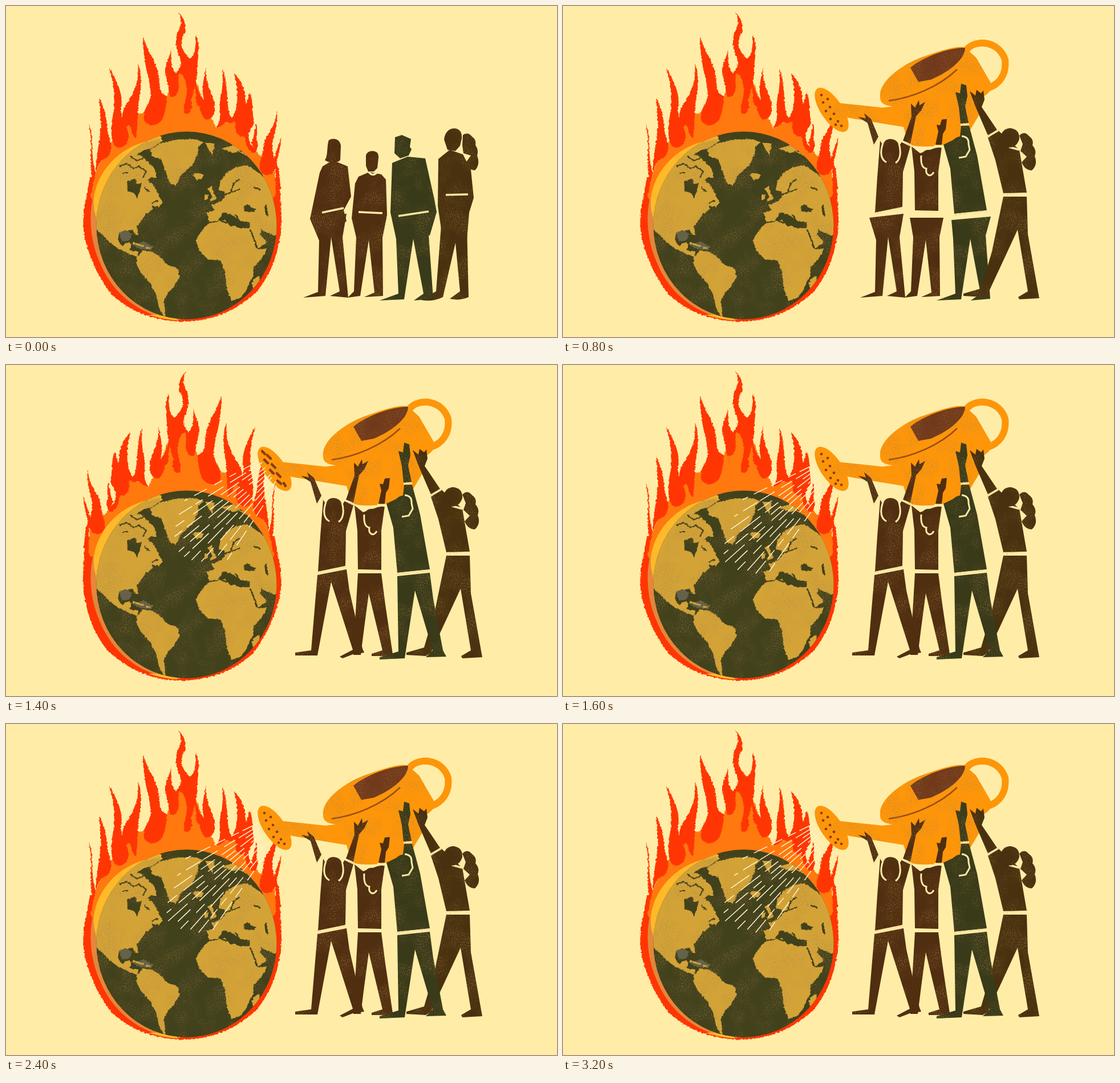
An HTML page for the animation above (3.4 s loop, 966 px wide and 580 px high).

```html
<!DOCTYPE html>
<html lang="en">
<head>
<meta charset="utf-8">
<title>Watering the world</title>
<style>
html, body { margin: 0; width: 100%; height: 100%; overflow: hidden; background: #ffeda7; }
svg { display: block; width: 966px; height: 580px; }
.red { fill: #ff3603; }
.orange { fill: #ff790f; }
.land { fill: #d3a337; }
.sea { fill: #41411c; }
.brown { fill: #502e10; }
.olive { fill: #49310f; }
.green { fill: #393a19; }
.can { fill: #ff9609; }
.seam { fill: none; stroke: #ffeda7; stroke-width: 3.5; }
.strait { fill: none; stroke: #41411c; stroke-width: 2.4; stroke-linejoin: round; }
.holes { fill: none; stroke: #8a3d10; stroke-width: 4.5; stroke-linecap: round; }
.water { fill: none; stroke: #fff3cc; stroke-width: 1.5; }
.off { display: none; }
</style>
</head>
<body>
<svg viewBox="0 0 966 580">
<defs>
  <filter id="grain" x="-5%" y="-5%" width="110%" height="110%" color-interpolation-filters="sRGB">
    <feTurbulence type="fractalNoise" baseFrequency=".5" numOctaves="2" seed="4"/>
    <feColorMatrix values="0 0 0 0 .66  0 0 0 0 .5  0 0 0 0 .27  5 0 0 0 -2.3" result="dots"/>
    <feTurbulence type="fractalNoise" baseFrequency=".025" numOctaves="3" seed="9"/>
    <feColorMatrix values="0 0 0 0 0  0 0 0 0 0  0 0 0 0 0  3 0 0 0 -1.2" result="patches"/>
    <feComposite in="dots" in2="patches" operator="in"/>
    <feComposite in2="SourceAlpha" operator="in"/>
    <feComponentTransfer result="specks"><feFuncA type="linear" slope=".45"/></feComponentTransfer>
    <feMerge><feMergeNode in="SourceGraphic"/><feMergeNode in="specks"/></feMerge>
  </filter>
  <filter id="rough" x="-5%" y="-5%" width="110%" height="110%" color-interpolation-filters="sRGB">
    <feTurbulence type="fractalNoise" baseFrequency=".25" numOctaves="2" seed="8"/>
    <feDisplacementMap in="SourceGraphic" scale="4" xChannelSelector="R" yChannelSelector="G"/>
  </filter>
  <clipPath id="disc"><ellipse cx="316.5" cy="384.5" rx="158" ry="164.5"/></clipPath>
</defs>

<g id="fire"><g filter="url(#rough)">
  <path class="red" d="M147 300C142 335 133 355 136 392C139 425 160 475 185 505C215 535 260 553 316 553C365 552 410 530 440 500C465 470 482 425 483 375C483 345 479 325 480 300Z"/>
  <path class="orange" d="M148 335L152 302L158 290L170 262L187 235L205 192L238 188L262 180L282 158L300 117L330 125L346 165L368 213L397 200L420 200L427 238L444 262L470 268L474 330L400 400H200Z"/>
  <g class="red">
    <path d="M151 305C145 275 153 245 145 206C156 232 147 262 157 291L149 332Z"/>
    <path d="M163 160C178 190 176 205 178 222C188 240 186 265 172 268C164 270 161 282 158 290C157 270 162 250 165 225C168 205 165 185 163 160Z"/>
    <path d="M181 108C192 128 206 150 202 180C200 195 206 200 212 215C220 235 210 248 198 248C185 247 183 225 186 200C192 170 191 140 181 108Z"/>
    <path d="M231 100C240 125 237 145 233 165C231 178 232 200 228 232C218 225 222 210 214 208C206 225 200 215 205 185C210 165 236 150 231 100Z"/>
    <path d="M240 54C250 85 268 100 269 135C270 150 275 155 282 158C280 190 275 208 256 209C238 207 238 190 250 170C262 145 240 115 240 54Z"/>
    <path d="M290 73C288 95 291 113 298 118C306 118 303 105 306 100L302 130C305 150 300 160 290 159C284 157 287 145 281 125C274 105 287 95 290 73Z"/>
    <path d="M302 10C312 22 320 35 311 52C304 65 309 80 322 92C331 90 333 70 333 50C342 75 335 90 335 120C334 140 328 150 325 165C328 175 325 188 318 189C308 188 312 175 316 160C320 140 312 115 300 118C292 120 308 112 307 98C304 85 295 75 299 52C302 40 313 35 302 10Z"/>
    <path d="M351 108C349 135 358 145 364 165C370 185 362 200 352 199C340 195 345 180 334 172L330 120C334 145 340 160 347 163C342 145 347 125 351 108Z"/>
    <path d="M379 110C390 135 386 165 391 185C392 195 398 200 404 195L398 203C388 210 392 200 385 205C378 210 372 213 369 213C380 195 372 185 376 160C380 140 381 130 379 110Z"/>
    <path d="M400 118C415 132 420 150 420 172C424 168 424 160 427 152C434 165 431 185 434 197C437 215 423 215 426 235C428 245 438 250 439 256C425 262 420 240 418 228C405 232 400 215 403 205C398 200 390 200 395 198C408 180 408 150 400 118Z"/>
    <path d="M439 206C443 225 436 230 442 245L438 256L430 240C436 230 434 220 439 206Z"/>
    <path d="M475 183C477 210 470 222 467 240C466 255 470 262 470 268C475 250 478 245 482 229C483 250 474 265 475 280L470 288C466 298 450 300 445 287C443 275 450 265 451 248C453 225 470 222 475 183Z"/>
    <path d="M472 272C480 285 479 300 482 320L474 330C470 310 477 290 470 280Z"/>
  </g>
</g></g>

<g id="globe" filter="url(#grain)">
  <path fill="#e6873a" d="M153 334C145 365 147 410 164 448C186 505 240 548 305 550L330 400L200 334Z"/>
  <path fill="#ffba29" d="M161 378C148 350 153 320 170 292C192 258 225 238 272 232L300 300L200 380Z"/>
  <path fill="#ffba29" d="M250 541Q275 549 300 551L300 540Z"/>
  <ellipse class="sea" cx="316.5" cy="384.5" rx="158" ry="164.5"/>
  <g clip-path="url(#disc)"><g filter="url(#rough)">
    <path fill="#f5b52d" d="M155 380V290L190 250L268 224L275 236L245 252L205 270L175 310L163 380Z"/>
    <g class="land">
      <path d="M150 385L160 345L175 300L196 272L222 258L240 264L250 275L262 286L264 302L254 300L248 306L258 313L267 330L275 344L268 352L255 350L258 356L246 364L238 374L230 386L232 402L226 400L222 392L208 394L198 398L196 410L203 420L214 414L220 417L216 428L232 430L231 440L215 434L196 425L180 412L168 400Z"/>
      <path d="M203 262L225 245L268 233L272 238L254 250L240 252L228 262L212 266Z"/>
      <path d="M252 252L272 240L300 234L332 233L346 239L337 247L336 260L326 280L308 295L297 315L287 310L279 288L272 268L257 264Z"/>
      <path d="M327 297L333 292L346 295L345 301L335 305Z"/>
      <path d="M230 440L240 428L258 431L273 442L282 453L302 461L304 476L295 491L285 501L277 516L280 548L269 532L263 505L252 485L237 468L228 452Z"/>
      <path d="M350 240L366 240L362 260L355 252ZM378 250L400 243L415 252L398 258ZM403 253L435 260L425 264Z"/>
      <path d="M354 320L361 315L364 328L370 338L357 343L361 333ZM348 332L354 330L354 338L348 340Z"/>
      <path d="M373 323L376 306L388 291L405 282L424 279L445 294L480 320L480 402L466 401L448 392L446 400L457 414L441 426L433 408L427 390L428 379L410 377L399 367L390 364L380 362L372 376L356 378L352 362L366 358L360 349L374 343L384 335L383 325Z"/>
      <path d="M356 381L385 375L392 385L404 386L409 390L427 389L432 405L441 427L458 425L448 443L434 458L434 473L426 485L421 499L410 512L395 517L387 495L384 466L376 446L354 444L339 429L333 410L345 391Z"/>
      <path d="M443 472Q448 485 436 497Q428 490 434 479Z"/>
    </g>
    <g class="sea">
      <path d="M212 308L226 302L230 312L238 310L235 322L230 337L224 328L213 324Z"/>
      <path d="M416 352L424 347L430 353L439 356L434 361L418 360Z"/>
      <path d="M453 350L457 348L460 370L455 365Z"/>
    </g>
    <path class="strait" d="M198 281L212 276L224 285L233 281L246 290L240 301M218 263L229 271L243 266M204 293L214 292M242 318L252 326M256 346L266 340"/>
    <path class="strait" d="M380 332L394 327L399 311L410 303M397 326L410 321M382 365L392 374L398 380M402 365L411 380M376 377L390 380L407 386L426 383"/>
    <path class="strait" d="M428 391L441 425M441 426L459 422M447 391L458 402L470 405M435 318L447 322"/>
    <path fill="#66624a" d="M198 397L212 393L221 400L216 411L203 413ZM222 418L241 413L258 421L255 428L234 426Z"/>
    <path class="land" d="M222 414L242 419L240 422L222 417ZM245 422L255 424L247 427Z"/>
  </g></g>
</g>

<g id="stand" filter="url(#grain)">
  <g class="brown">
    <path d="M566 235C575 230 586 234 587 245L586 270C580 277 565 275 559 270C565 262 562 245 566 235Z"/>
    <path d="M555 281L570 272L582 274L599 281L605 334L592 358L597 377L549 411L533 373L550 292Z"/>
    <path d="M631 262Q633 254 643 254Q654 255 653 266L651 284L645 290L635 290L631 280Z"/>
    <path d="M618 299L637 291L658 295L666 304L668 366L660 405L614 405L606 372L612 311Z"/>
  </g>
  <g class="olive">
    <path d="M768 234C770 218 780 213 790 215Q800 218 799 232L796 245L788 254L774 252Z"/>
    <path d="M758 268L778 252L801 260L815 287L820 336L812 362L808 410L765 405L757 350Z"/>
    <path d="M801 226Q810 220 817 229Q825 234 823 244Q829 252 826 262Q832 278 822 288Q812 288 805 276L815 262L802 258L800 244Z"/>
    <path d="M763 384H808L811 510Q795 517 778 513L796 500L788 415L766 510Q748 519 727 515L754 500Z"/>
  </g>
  <path class="green" d="M682 230L694 226L710 233L708 247L711 251L706 262L691 267L681 258Z"/>
  <path class="green" d="M677 275L704 264L735 267L751 339L755 361L743 402L684 408L674 362Z"/>
  <path class="seam" d="M554 362L592 354M618 361L660 363M688 368L741 360M771 331L810 330M636 291Q643 300 651 291"/>
</g>
<g id="legs" filter="url(#grain)">
  <path class="brown" d="M537 371L597 364L590 405L600 511L568 508L585 500L570 405L560 508L521 511L547 501L549 410Z"/>
  <path class="brown" d="M608 371H667L660 405L661 508L628 510L646 502L636 410L621 508L599 511L610 500L614 405Z"/>
  <path class="green" d="M681 375L750 369L741 402L749 513L715 516L732 504L714 408L698 514L655 516L688 504L684 408Z"/>
</g>

<g id="can" class="off">
  <g filter="url(#grain)">
    <path d="M708 76C725 57 765 62 775 94C778 120 765 138 744 144" fill="none" stroke="#ff9609" stroke-width="12"/>
    <path class="can" d="M556 160C553 130 600 98 640 86C672 74 700 68 706 74L724 90L749 133C754 145 748 152 738 158L730 190L705 232C680 243 630 252 606 242L597 212L495 195L484 170L560 178L578 176C566 174 556 172 556 160Z"/>
    <path fill="#71391a" d="M609 108C630 90 675 73 705 73C705 92 680 114 645 129L623 133Z"/>
    <path d="M571 166C612 161 660 141 691 111" fill="none" stroke="#9a4c13" stroke-width="2.5"/>
    <ellipse class="can" cx="471" cy="182" rx="45" ry="19" transform="rotate(56 471 182)"/>
  </g>
  <path id="dots" class="holes" d="M453 156h.1M464 163h.1M456 169h.1M468 177h.1M461 184h.1M475 189h.1M469 198h.1M482 202h.1M478 208h.1M488 210h.1"/>
  <path id="slots" class="holes" d="M449 151l5 5M458 158l6 6M453 166l6 6M466 174l6 6M463 184l6 6M475 190l6 6M476 203l6 5M487 207l3 5"/>
</g>

<g id="arms" class="off" filter="url(#grain)">
  <path class="brown" d="M517 194L531 197L528 188L540 198L553 229L545 243L534 205Z"/>
  <path class="brown" d="M596 236L611 194L610 171L617 178L624 165L625 174L635 168L628 183L619 193L609 241Z"/>
  <path class="brown" d="M653 243L658 220L655 208L661 209L664 199L673 198L671 216L666 224L664 243Z"/>
  <path class="green" d="M697 206L694 177L688 151L696 153L698 136L707 139L709 158L705 176L711 205Z"/>
  <path class="olive" d="M745 227L723 176L713 149L723 157L725 147L733 153L737 148L739 164L734 177L761 217Z"/>
</g>

<g id="lift" class="off" filter="url(#grain)">
  <path class="brown" d="M556 236L563 248H588L594 238L609 246L596 291L595 352L547 362L551 300Z"/>
  <path class="brown" d="M611 246L626 258L652 249L664 247L658 290L658 359L617 358L616 290Z"/>
  <path class="green" d="M667 243L696 229L698 210L712 210L726 262L743 358L686 364L679 285Z"/>
  <path class="olive" d="M745 231L763 218L781 235L800 252L813 327L772 328L758 270Z"/>
  <path class="brown" d="M560 248Q562 233 574 233Q588 234 590 248L588 268Q574 280 562 268Z"/>
  <path class="brown" d="M628 265Q630 252 641 252Q655 254 655 267L650 290L638 290Z"/>
  <path class="green" d="M680 240Q690 224 709 230L712 250L705 263L692 267L681 258Z"/>
  <g class="seam">
    <path d="M545 246L556 230M594 237L611 245M651 245L666 247M697 208L712 207M744 229L763 218M546 364L596 354M616 361H659M685 366L744 360M771 331L813 329M782 247L800 252"/>
    <path d="M561 240C556 255 556 268 567 274M589 241C593 255 592 269 583 275M628 262C627 276 630 284 637 285C635 297 645 301 650 291M699 228Q712 229 711 242L713 252L706 264L694 266" stroke-width="3"/>
  </g>
  <path class="olive" d="M767 231Q769 215 784 214Q801 216 800 233Q796 247 783 248Q768 244 767 231Z"/>
  <path class="olive" d="M800 227Q809 218 817 228Q826 234 823 244Q831 253 827 263Q833 278 822 288Q810 288 804 274L813 264L802 254L806 242Z"/>
  <path class="olive" d="M772 334H813L815 400L831 490L835 512L800 514L798 510L815 500L797 392L745 504L736 510L702 508V504L733 495L752 430Z"/>
</g>
<g id="stride" class="off" filter="url(#grain)">
  <path class="brown" d="M546 368L597 358L602 395L625 497L628 504L608 507L590 514L585 511L608 499L570 380L546 509H507V504L535 500Z"/>
  <path class="brown" d="M617 365H658L665 420L677 500L678 507L660 510H641V506L660 500L636 400L628 460L622 508L609 508L612 450Z"/>
  <path class="green" d="M686 370L743 364L749 410L766 500L772 511L736 512L748 500L717 395L699 514L655 516V512L688 502Z"/>
</g>
<path id="sprayA" class="water off"/>
<path id="sprayB" class="water off"/>
</svg>
<script>
const el = id => document.getElementById(id);
const show = (id, on) => el(id).classList.toggle('off', !on);

let seed = 7;
const rand = () => (seed = seed * 16807 % 2147483647) / 2147483647;
const curve = (a, b, c, u) => (1 - u) * (1 - u) * a + 2 * u * (1 - u) * b + u * u * c;

// Broken streaks fanning from the rose towards an arc of end points
function spray(id, x0, y0, x1, y1, xs, ys) {
  const n = 11;
  let d = '';
  for (let i = 0; i < n; i++) {
    const u = i / (n - 1);
    const sx = x0 + (x1 - x0) * u, sy = y0 + (y1 - y0) * u;
    const ex = curve(...xs, u), ey = curve(...ys, u);
    const at = p => (sx + (ex - sx) * p).toFixed(1) + ' ' + (sy + (ey - sy) * p).toFixed(1);
    for (let p = rand() * .08; p < 1;) {
      const q = Math.min(1, p + .08 + rand() * .14);
      d += 'M' + at(p) + 'L' + at(q);
      p = q + .03 + rand() * .07;
    }
  }
  el(id).setAttribute('d', d);
}
spray('sprayA', 441, 174, 464, 216, [315, 230, 362], [236, 392, 361]);
spray('sprayB', 449, 165, 477, 207, [313, 255, 388], [238, 365, 341]);

const start = performance.now();
let last = -1;
function draw() {
  const step = Math.floor((performance.now() - start) % 3400 / 200);
  if (step !== last) {
    last = step;
    const flip = step % 2 === 1, pour = step >= 5;
    el('fire').setAttribute('transform', flip ? 'translate(618) scale(-1 1)' : '');
    show('stand', step < 4);
    show('legs', !pour);
    show('arms', step >= 3);
    el('arms').setAttribute('transform', step === 3 ? 'translate(3 48)' : '');
    for (const id of ['can', 'lift']) show(id, step >= 4);
    show('stride', pour);
    show('dots', !(flip && pour));
    show('slots', flip && pour);
    show('sprayA', pour && !flip);
    show('sprayB', pour && flip);
  }
  requestAnimationFrame(draw);
}
draw();
</script>
</body>
</html>
```
